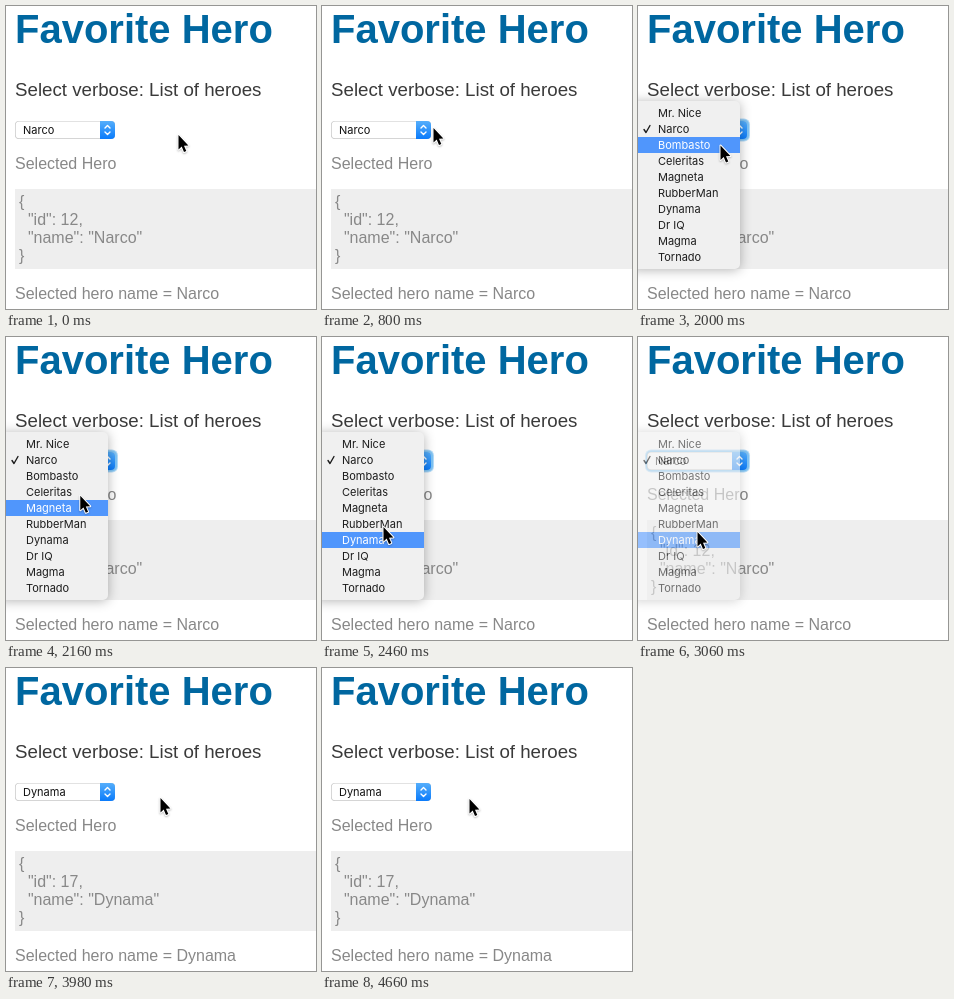
These frames come from a looping animation (310 by 303 pixels, 4.78 s). An HTML page with a canvas:

```html
<!DOCTYPE html>
<html lang="en">
<head>
<meta charset="utf-8">
<title>Favorite Hero</title>
<style>
html, body { margin: 0; width: 100%; height: 100%; overflow: hidden; background: #fff; }
canvas { display: block; width: 310px; height: 303px; }
</style>
</head>
<body>
<canvas id="stage"></canvas>
<script>
const W = 310, H = 303, LOOP = 4780, TICK = 20;
const SANS = '"Liberation Sans", Arial, sans-serif';
const UI = '11px Inter, Roboto, sans-serif';
const HEROES = ['Mr. Nice', 'Narco', 'Bombasto', 'Celeritas', 'Magneta',
  'RubberMan', 'Dynama', 'Dr IQ', 'Magma', 'Tornado'];
const MENU = { top: 95, first: 99, row: 16, right: 102, bottom: 263 };

// Pointer path: time, x, y
const PATH = [
  [0, 172, 129], [300, 172, 129], [800, 111, 122],
  [1140, 111, 122], [1320, 91, 121.5],
  [1900, 91, 121.5], [1940, 92, 125], [2000, 82, 139.5], [2440, 62, 189.5],
  [2460, 61, 190], [2620, 59, 195],
  [3300, 59, 195], [3380, 91, 181], [3500, 114, 166.5], [3800, 154, 130],
  [4520, 154, 130], [4580, 151, 132], [4660, 147, 131], [LOOP, 147, 131]
];

const ratio = window.devicePixelRatio || 1;
function setup(canvas) {
  canvas.width = Math.round(W * ratio);
  canvas.height = Math.round(H * ratio);
  const c = canvas.getContext('2d');
  c.scale(ratio, ratio);
  return c;
}
const g = setup(document.getElementById('stage'));
const layer = document.createElement('canvas');
const m = setup(layer);

const clamp = v => Math.max(0, Math.min(1, v));

function text(c, str, x, y, font, color) {
  c.font = font;
  c.fillStyle = color;
  c.fillText(str, x, y);
}

function box(c, x, y, w, h, r) {
  c.beginPath();
  c.roundRect(x, y, w, h, r);
}

function line(c, pts, color, width) {
  c.beginPath();
  pts.forEach(([x, y]) => c.lineTo(x, y));
  c.strokeStyle = color;
  c.lineWidth = width;
  c.lineCap = c.lineJoin = 'round';
  c.stroke();
}

// Smooth curve through the path, at rest wherever a point repeats
function pointerAt(t) {
  let i = 0;
  while (i < PATH.length - 2 && t >= PATH[i + 1][0]) i++;
  const same = (a, b) => !a || !b || (a[1] === b[1] && a[2] === b[2]);
  const slope = (k, n) => {
    const a = PATH[k - 1], b = PATH[k], c = PATH[k + 1];
    return same(a, b) || same(b, c) ? 0 : (c[n] - a[n]) / (c[0] - a[0]);
  };
  const p = PATH[i], q = PATH[i + 1], d = q[0] - p[0], u = (t - p[0]) / d;
  const s = u * u * (3 - 2 * u);
  return [1, 2].map(n => p[n] + (q[n] - p[n]) * s +
    d * u * (1 - u) * ((1 - u) * slope(i, n) - u * slope(i + 1, n)));
}

function drawPage(hero, id) {
  const body = '16px ' + SANS, gray = '#888';
  g.fillStyle = '#fff';
  g.fillRect(0, 0, W, H);
  text(g, 'Favorite Hero', 9, 37, 'bold 40px ' + SANS, '#0067a0');
  text(g, 'Select verbose: List of heroes', 9, 90, '18.72px ' + SANS, '#3a3a3a');
  text(g, 'Selected Hero', 9, 163, body, gray);
  g.fillStyle = '#eee';
  g.fillRect(9, 183, 301, 80);
  ['{', `  "id": ${id},`, `  "name": "${hero}"`, '}']
    .forEach((s, i) => text(g, s, 13, 201 + 18 * i, body, gray));
  text(g, 'Selected hero name = ' + hero, 9, 293, body, gray);
}

function drawSelect(hero, ring) {
  if (ring > 0) {
    g.globalAlpha = ring;
    box(g, 7, 112.5, 105, 23, 6);
    g.fillStyle = '#b5dcf8';
    g.fill();
    box(g, 8, 113.5, 103, 21, 5);
    g.fillStyle = '#7fc4f5';
    g.fill();
    g.globalAlpha = 1;
  }
  box(g, 9, 115, 100, 18, 4);
  g.fillStyle = '#c6c6c6';
  g.fill();
  box(g, 9.7, 115.6, 98.6, 16.6, 3.5);
  g.fillStyle = '#fff';
  g.fill();
  const blue = g.createLinearGradient(0, 115, 0, 133);
  blue.addColorStop(0, '#55aefb');
  blue.addColorStop(1, '#0a7bfb');
  box(g, 94, 115, 15, 18, [0, 4, 4, 0]);
  g.fillStyle = blue;
  g.fill();
  line(g, [[99, 122], [101.5, 119.5], [104, 122]], '#fff', 1.4);
  line(g, [[99, 126], [101.5, 128.5], [104, 126]], '#fff', 1.4);
  text(g, hero, 17, 128, UI, '#111');
}

function drawMenu(active, alpha) {
  m.clearRect(0, 0, W, H);
  m.save();
  m.shadowColor = 'rgba(0,0,0,.3)';
  m.shadowBlur = 12 * ratio;
  m.shadowOffsetY = 1 * ratio;
  box(m, -8, MENU.top, MENU.right + 8, MENU.bottom - MENU.top, 5);
  m.fillStyle = '#f0f0f0';
  m.fill();
  m.restore();
  if (active >= 0) {
    m.fillStyle = '#5096fc';
    m.fillRect(0, MENU.first + active * MENU.row, MENU.right, MENU.row);
  }
  HEROES.forEach((name, i) => {
    const color = i === active ? '#fff' : '#1c1c1c';
    const y = MENU.first + i * MENU.row;
    text(m, name, 20, y + 12, UI, color);
    if (i === 1) line(m, [[6, y + 8.5], [8, y + 11.5], [12, y + 4.5]], color, 1.4);
  });
  g.globalAlpha = alpha;
  g.drawImage(layer, 0, 0, W, H);
  g.globalAlpha = 1;
}

function drawPointer(x, y) {
  g.save();
  g.translate(x, y);
  g.beginPath();
  [[0.5, 0], [0.5, 14.5], [3.7, 11.6], [6, 17], [8.3, 16], [6, 10.8], [10.4, 10.4]]
    .forEach(([a, b]) => g.lineTo(a, b));
  g.closePath();
  g.lineJoin = 'round';
  g.strokeStyle = '#fff';
  g.lineWidth = 2;
  g.shadowColor = 'rgba(0,0,0,.25)';
  g.shadowBlur = 2 * ratio;
  g.shadowOffsetY = ratio;
  g.stroke();
  g.shadowColor = 'transparent';
  g.fillStyle = '#000';
  g.fill();
  g.restore();
}

function draw(time) {
  const t = Math.floor(time % LOOP / TICK) * TICK;
  const [x, y] = pointerAt(t);
  const picked = t >= 3200;
  const hero = HEROES[picked ? 6 : 1];
  drawPage(hero, picked ? 17 : 12);
  drawSelect(hero, t < 3980 ? clamp((t - 1580) / 120) : 0);
  if (t >= 1620 && t < 3180) {
    const blink = t >= 2860 && t < 2920;
    const row = Math.floor((y + 5 - MENU.first) / MENU.row);
    drawMenu(blink ? -1 : row, 1 - clamp((t - 2980) / 200));
  }
  drawPointer(x, y);
}

let start;
function frame(now) {
  if (start === undefined) start = now;
  draw(now - start);
  requestAnimationFrame(frame);
}
draw(0);
requestAnimationFrame(frame);
</script>
</body>
</html>
```
